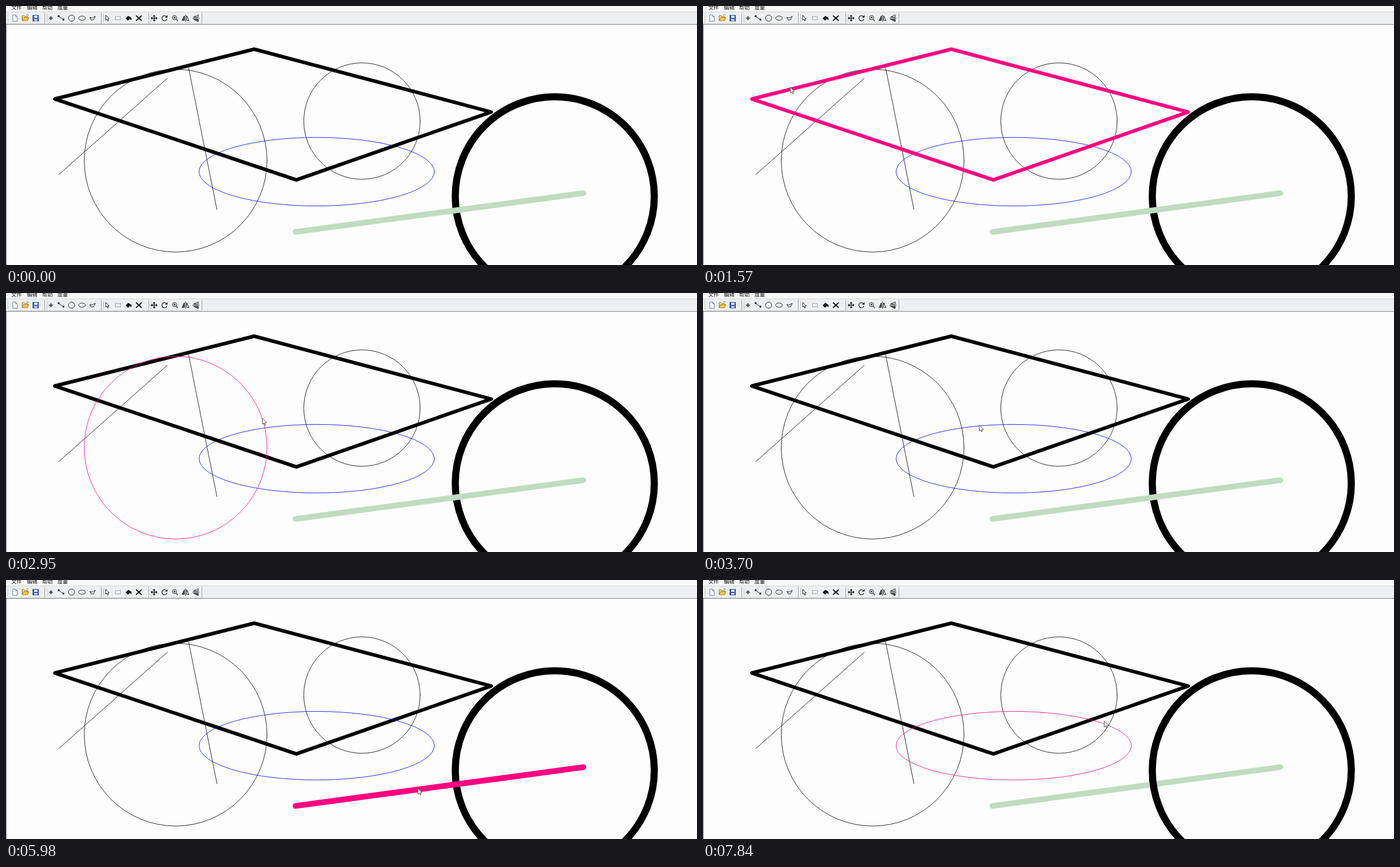
Recreate the animation shown at these times as an HTML page. Size 1222 by 458 pixels, loop 8000 ms.

```html
<!DOCTYPE html>
<html>
<head>
<meta charset="utf-8">
<style>
html, body { margin: 0; width: 100%; height: 100%; overflow: hidden; background: #fdfdfd; }
svg { display: block; width: 1222px; height: 458px; }
#shapes { fill: none; stroke: #000; stroke-width: .85; stroke-linejoin: round; stroke-linecap: round; }
#oval { stroke: #00f; }
#bar { stroke: #c0dcc0; stroke-width: 10; }
#ring { stroke-width: 12.6; }
#poly { stroke-width: 6.3; }
#shapes .hot { stroke: #ff0080; }
#menu { font: 9.3px "Noto Sans CJK SC", "Noto Sans CJK", sans-serif; fill: #111; }
#icons { fill: none; stroke: #222; }
#icons .solid { fill: #111; stroke: none; }
</style>
</head>
<body>
<svg viewBox="0 0 1222 458">
  <rect width="1222" height="458" fill="#fdfdfd"/>
  <g id="shapes">
    <path id="slant" d="M285 128L93.5 298"/>
    <path id="steep" d="M322.5 107L373 360"/>
    <circle id="big" cx="300" cy="273.5" r="161.6"/>
    <circle id="small" cx="629.5" cy="203.5" r="102.9"/>
    <ellipse id="oval" cx="549.5" cy="293" rx="208" ry="60.6"/>
    <circle id="ring" cx="970.5" cy="336.5" r="176"/>
    <path id="bar" d="M512 399.5L1021 331"/>
    <path id="poly" d="M86.5 164.4L439 76.4L858 187.5L513.5 307.5Z"/>
  </g>

  <g shape-rendering="crispEdges">
    <rect width="1222" height="32" fill="#eeeff0"/>
    <rect width="1222" height="10" fill="#f8f8f9"/>
    <path d="M0 10.5H1222M0 31.5H346" stroke="#d2d3d5"/>
    <path d="M0 32.5H1222M.5 33V458" stroke="#858585"/>
    <path d="M68.5 12V31M168.5 12V31M252.5 12V31M346.5 12V31" stroke="#a4a4a4"/>
    <path d="M72.5 14V29M172.5 14V29M256.5 14V29M3.5 14V29" stroke="#c4c4c4"/>
  </g>
  <g id="menu">
    <text x="9.5" y="6">文件</text><text x="37" y="6">编辑</text>
    <text x="64" y="6">帮助</text><text x="91" y="6">度量</text>
  </g>

  <g id="icons">
    <path d="M12 16H17L20 19V27H12ZM17 16V19H20" fill="#fff" stroke="#6b7d94"/>
    <path d="M28.5 26V17H32L33 18.5H38V21" fill="#f7dc83" stroke="#9a7928"/>
    <path d="M28.5 26L31 20.5H40.5L38 26Z" fill="#ffc845" stroke="#9a7928"/>
    <path d="M36 16Q39 14 40 17" stroke="#4b6f9b"/>
    <rect x="47.5" y="16.5" width="10" height="10" fill="#4667c8" stroke="#2b4296"/>
    <path d="M50 17H55.5V21H50ZM50 23.5H55.5V26H50Z" fill="#eef2ff" stroke="none"/>
    <path d="M79.5 18V25M76 21.5H83" stroke-width="1.5"/>
    <path d="M93 18L101 24"/>
    <path class="solid" d="M91.5 16.5h3v3h-3zM100 22.5h3v3h-3z"/>
    <circle cx="116" cy="21.5" r="5.5"/>
    <ellipse cx="134.5" cy="21.5" rx="6" ry="3.7"/>
    <path d="M148 20L152 21.5L158 18L155 24L151 25Z"/>
    <path d="M176.5 16.5V25L178.5 23.3L180 26.5L181.3 26L180 22.8H182.5Z" fill="#fff"/>
    <rect x="193.5" y="18.5" width="9" height="6" stroke="#777" stroke-dasharray="1.5 1"/>
    <path class="solid" d="M211.5 22L216 17.5L221 20Q223 23 221.5 25L219 23L216 26Z"/>
    <path d="M230 17L240 26M240 17L230 26" stroke="#111" stroke-width="2"/>
    <path d="M262 17V26M257.5 21.5H266.5" stroke-width="1.3"/>
    <path class="solid" d="M262 15.5l2.5 3h-5zM262 27.5l2.5-3h-5zM256 21.5l3-2.5v5zM268 21.5l-3-2.5v5z"/>
    <path d="M283.5 18.5A4.5 4.5 0 1 0 284.5 23" stroke-width="1.3"/>
    <path class="solid" d="M285.5 16V20.5H281Z"/>
    <circle cx="298" cy="20.5" r="3.7"/>
    <path d="M296 20.5H300M298 18.5V22.5M301 23.5L304 26.5" stroke-width="1.2"/>
    <g id="mirror">
      <path d="M317.5 15.5V27.5M319.5 17V25.5H323.5Z"/>
      <path d="M315.5 17V25.5H311.5Z" fill="#555"/>
    </g>
    <use href="#mirror" transform="translate(18.5) rotate(-90 317.5 21.5)"/>
  </g>

  <path id="cursor" d="M.5 .5V11L3 8.7L4.7 12.5L6.2 11.9L4.6 8.2H7.8Z" fill="#fff" stroke="#444" stroke-width=".9"/>
</svg>
<script>
const LOOP = 8000, STEP = 30;
const byId = id => document.getElementById(id);

// Each selected shape keeps its highlight until it is dropped
const picks = [
  { id: 'poly', from: 1480, to: 2350 },
  { id: 'big', from: 2890, to: 3220 },
  { id: 'oval', from: 3730, to: 4060 },
  { id: 'small', from: 5530, to: 5950 },
  { id: 'bar', from: 5950, to: 6670 },
  { id: 'ring', from: 6670, to: 7450 },
  { id: 'oval', from: 7480, to: LOOP }
];

// The pointer eases to each place in turn and rests there
const entry = { x: 1187, y: 38 };
const moves = [
  { at: 100, ms: 270, x: 183, y: 34, sag: 40 },
  { at: 670, ms: 150, x: 176, y: 14 },
  { at: 1060, ms: 390, x: 154, y: 143 },
  { at: 1930, ms: 120, x: 477, y: 138 },
  { at: 2380, ms: 360, x: 453, y: 221, sag: 10 },
  { at: 3130, ms: 90, x: 473, y: 138 },
  { at: 3430, ms: 270, x: 488, y: 233 },
  { at: 3820, ms: 180, x: 494, y: 165 },
  { at: 4600, ms: 360, x: 652, y: 311 },
  { at: 5740, ms: 210, x: 728, y: 368 },
  { at: 6460, ms: 180, x: 808, y: 273 },
  { at: 6910, ms: 330, x: 709, y: 249 }
];

const layer = byId('shapes');
const cursor = byId('cursor');
const baseOrder = [...layer.children];
let painted = -1;

// A pick brings its shape to the front, where it stays
function paintShapes(t) {
  const made = picks.filter(p => t >= p.from);
  if (made.length !== painted) {
    painted = made.length;
    layer.append(...baseOrder, ...made.map(p => byId(p.id)));
  }
  for (const el of baseOrder) {
    el.classList.toggle('hot', made.some(p => p.id === el.id && t < p.to));
    el.style.stroke = el.classList.contains('hot') ? '#ff0080' : '';
  }
}

const easeOut = k => 1 - (1 - k) ** 2;

function pointerAt(t) {
  let { x, y } = entry;
  for (const m of moves) {
    if (t < m.at) break;
    const k = easeOut(Math.min(1, (t - m.at) / m.ms));
    x += (m.x - x) * k;
    y += (m.y - y) * k + (m.sag || 0) * Math.sin(Math.PI * k);
  }
  return [x, y].map(Math.round);
}

function draw(time) {
  const t = Math.floor((time % LOOP - 10) / STEP) * STEP + 10;
  paintShapes(t);
  cursor.style.display = t < moves[0].at ? 'none' : '';
  cursor.setAttribute('transform', `translate(${pointerAt(t)})`);
}

const start = performance.now();
function frame() {
  draw(performance.now() - start);
  requestAnimationFrame(frame);
}
frame();
</script>
</body>
</html>
```
